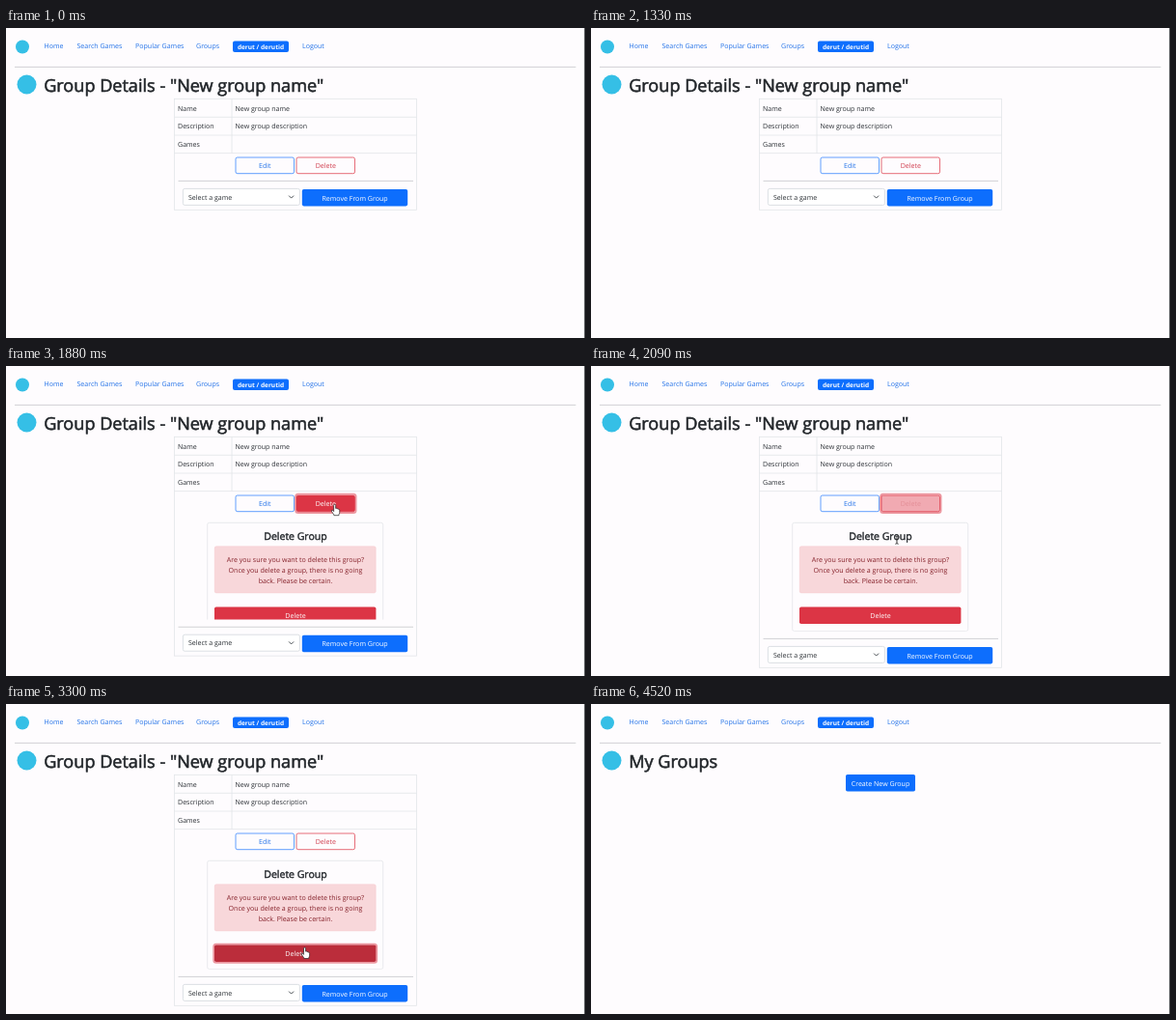
An HTML page for the animation above (5790 ms loop, 600x321 px).

```html
<!DOCTYPE html>
<html lang="en">
<head>
<meta charset="utf-8">
<title>Group details</title>
<style>
  html, body { margin: 0; width: 100%; height: 100%; overflow: hidden; background: #fefcfe; }
  svg { display: block; width: 100vw; height: 100vh; }
  text { font: 7.05px "Open Sans", "Noto Sans", sans-serif; fill: #2b3035; text-rendering: geometricPrecision; }
  .link { fill: #2272e8; }
  .mid { text-anchor: middle; }
  .white { fill: #fff; }
  .badge { font-size: 6.5px; font-weight: 700; }
  .h1 { font-size: 18.08px; fill: #212529; stroke: #212529; stroke-width: .55px; }
  .h4 { font-size: 10.5px; fill: #212529; stroke: #212529; stroke-width: .4px; }
  .alert { fill: #842029; }
  .line { fill: none; stroke: #e3e5e9; stroke-width: .8; }
  .rule { stroke: #d2d2d5; stroke-width: 1; }
  .outline { fill: none; stroke: #0d6efd; stroke-width: .9; stroke-opacity: .72; }
  .ring { fill: none; stroke: #dc3545; stroke-width: 1.8; }
  .blue { fill: #0d6efd; }
  .cursor { fill: #fff; stroke: #222; stroke-width: .7; stroke-linejoin: round; }
</style>
</head>
<body>
<svg viewBox="0 0 600 321" preserveAspectRatio="none">
  <defs>
    <clipPath id="fold"><rect id="foldBox" x="200" y="155" width="200" height="0"/></clipPath>
  </defs>
  <rect width="600" height="321" fill="#fefcfe"/>

  <circle cx="17" cy="19.5" r="7" fill="#35bfe6"/>
  <text class="link" x="39.5" y="21">Home</text>
  <text class="link" x="73.5" y="21">Search Games</text>
  <text class="link" x="134" y="21">Popular Games</text>
  <text class="link" x="197" y="21">Groups</text>
  <rect class="blue" x="235" y="13.5" width="58" height="11.5" rx="2"/>
  <text class="badge white mid" x="264" y="21.7">derut / derutid</text>
  <text class="link" x="307" y="21">Logout</text>
  <path class="rule" d="M9 40.4H590.5"/>
  <circle cx="21.5" cy="58.5" r="10" fill="#35bfe6"/>
  <text id="title" class="h1" x="39.2" y="65.8"></text>

  <g id="details">
    <path class="line" d="M174.5 92.3H425.5M174.5 111H425.5M174.5 129.6H425.5M234 73.3V129.6"/>
    <rect id="frame" class="line" x="174.5" y="73.3" width="251" height="115"/>
    <text x="178" y="85.6">Name</text>
    <text x="237.5" y="85.6">New group name</text>
    <text x="178" y="104.4">Description</text>
    <text x="237.5" y="104.4">New group description</text>
    <text x="178" y="123">Games</text>

    <rect class="outline" x="238" y="134" width="60.5" height="16.7" rx="1.8"/>
    <text class="link mid" x="268.3" y="145">Edit</text>
    <rect id="ring1" class="ring" x="300.1" y="132.7" width="62.5" height="19.3" rx="2.6"/>
    <rect id="del" x="301" y="134" width="60.5" height="16.7" rx="1.8" stroke="#dc3545" stroke-width=".9" stroke-opacity=".8"/>
    <text id="delText" class="mid" x="331.3" y="145">Delete</text>

    <g clip-path="url(#fold)">
      <rect class="line" x="208.7" y="162.3" width="182" height="112.2" rx="2"/>
      <text class="h4 mid" x="300" y="180.4">Delete Group</text>
      <rect x="216.2" y="186.7" width="167" height="48.3" rx="1.8" fill="#f8d7da" stroke="#f5c2c7" stroke-width=".4"/>
      <text class="alert mid" x="300" y="202.5">Are you sure you want to delete this group?</text>
      <text class="alert mid" x="300" y="213.5">Once you delete a group, there is no going</text>
      <text class="alert mid" x="300" y="224.5">back. Please be certain.</text>
      <rect id="ring2" class="ring" x="215.2" y="248.7" width="169" height="19.2" rx="2.6"/>
      <rect id="confirm" x="216" y="249.5" width="167.4" height="17.6" rx="1.8"/>
      <text class="white mid" x="300" y="260.9">Delete</text>
    </g>

    <g id="lower">
      <path class="rule" d="M178.5 158.4H422"/>
      <rect x="183.4" y="166.4" width="121" height="17" rx="1.8" fill="#fff" stroke="#d3d8dd" stroke-width=".8"/>
      <text x="189" y="177.5">Select a game</text>
      <path d="M293.4 173.9L295.6 176.1L297.8 173.9" fill="none" stroke="#343a40" stroke-width=".9" stroke-linecap="round"/>
      <rect class="blue" x="306.8" y="166.9" width="109.4" height="17.5" rx="1.8"/>
      <text class="white mid" x="361.5" y="178.6">Remove From Group</text>
    </g>
  </g>

  <g id="groups">
    <rect class="blue" x="264" y="73" width="72" height="17.6" rx="1.8"/>
    <text class="white mid" x="300" y="84.6">Create New Group</text>
  </g>

  <path d="M599.5 0V321" stroke="#77797c" stroke-width="1"/>

  <g id="pointer" class="cursor">
    <path id="arrow" d="M0 0V8.6L2 6.8L3.4 9.8L4.7 9.2L3.4 6.3H6.1Z"/>
    <path id="hand" d="M-1 .8A1 1 0 0 1 1 .8V3.9Q2.3 3.4 2.7 4.4Q3.9 4 4.1 5Q5.1 4.9 5.1 6V8Q5 9.4 4.3 10.3V11.2H-.8V10.4Q-2.2 8.8 -3.3 6.7Q-3.6 5.4 -2.4 5.7L-1 7.1Z"/>
    <path id="beam" d="M-1.6 -4Q0 -4 0 -3.2Q0 -4 1.6 -4M0 -3.2V3.2M-1.6 4Q0 4 0 3.2Q0 4 1.6 4" fill="none" stroke-width=".9"/>
  </g>
</svg>
<script>
const LOOP = 5790;
const HOVER_IN = 1550, CLICK = 1640, OPEN = 1662, HOVER_OUT = 2040;
const CONFIRM_HOVER = 2440, CONFIRM_CLICK = 2930, NEXT_PAGE = 3510;
const MOVE_OFF = 4360, ENTER = 1480, EXIT = 4515;
const OPEN_HEIGHT = 124;

// time, x, y of the pointer's hot spot
const route = [
  [ENTER, 412, 158], [1530, 372, 148], [1600, 340.8, 143.5], [1960, 340.6, 143.5],
  [HOVER_OUT, 330, 152], [2090, 317, 180], [2200, 314, 207], [2330, 311, 236],
  [2450, 309.5, 252.3], [MOVE_OFF, 309.5, 252.3], [4420, 370, 249], [4490, 582, 240], [EXIT, 600, 240]
];

const el = {};
document.querySelectorAll('svg [id]').forEach(n => el[n.id] = n);
const set = (id, name, value) => el[id].setAttribute(name, value);
const show = (id, on) => set(id, 'visibility', on ? 'visible' : 'hidden');
const clamp = v => Math.min(1, Math.max(0, v));
const lerp = (a, b, p) => a + (b - a) * p;
const mix = (a, b, p) => `rgb(${a.map((v, i) => Math.round(lerp(v, b[i], p)))})`;

// CSS "ease": cubic-bezier(.25, .1, .25, 1)
function ease(x) {
  x = clamp(x);
  const bez = (a, b, s) => 3 * a * s * (1 - s) ** 2 + 3 * b * s * s * (1 - s) + s ** 3;
  let lo = 0, hi = 1;
  for (let i = 0; i < 24; i++) {
    const s = (lo + hi) / 2;
    if (bez(.25, .25, s) < x) lo = s; else hi = s;
  }
  return bez(.1, 1, lo);
}
const fade = (t, start, length = 150) => ease((t - start) / length);

function pointerAt(t) {
  let i = 0;
  while (i < route.length - 2 && t > route[i + 1][0]) i++;
  const [t0, x0, y0] = route[i], [t1, x1, y1] = route[i + 1];
  const p = clamp((t - t0) / (t1 - t0));
  return [lerp(x0, x1, p), lerp(y0, y1, p)];
}

function pointerKind(t, y) {
  if (t >= MOVE_OFF || t < HOVER_IN) return 'arrow';
  if (t < HOVER_OUT || t >= CONFIRM_HOVER) return 'hand';
  return (y > 170 && y < 184) || (y > 193 && y < 228) ? 'beam' : 'arrow';
}

function draw(t) {
  const onDetails = t < NEXT_PAGE;
  el.title.textContent = onDetails ? 'Group Details - "New group name"' : 'My Groups';
  set('details', 'display', onDetails ? 'inline' : 'none');
  set('groups', 'display', onDetails ? 'none' : 'inline');

  const drop = OPEN_HEIGHT * fade(t, OPEN, 350);
  set('lower', 'transform', `translate(0 ${drop})`);
  set('frame', 'height', 115 + drop);
  set('foldBox', 'height', Math.max(0, drop - 4.2));

  const hover = fade(t, HOVER_IN) - fade(t, HOVER_OUT);
  set('del', 'fill', `rgba(220,53,69,${hover})`);
  set('delText', 'style', `fill:${mix([208, 62, 78], [255, 255, 255], hover)}`);
  set('confirm', 'fill', mix([220, 53, 69], [187, 45, 59], fade(t, CONFIRM_HOVER)));
  const moved = fade(t, CONFIRM_CLICK);
  set('ring1', 'opacity', .5 * (fade(t, CLICK) - moved));
  set('ring2', 'opacity', .5 * moved);

  const [x, y] = pointerAt(t);
  const visible = t >= ENTER && t < EXIT;
  const kind = pointerKind(t, y);
  set('pointer', 'transform', `translate(${x} ${y})`);
  for (const id of ['arrow', 'hand', 'beam']) show(id, visible && id === kind);
}

const start = performance.now();
function tick() {
  draw((performance.now() - start) % LOOP);
  requestAnimationFrame(tick);
}
tick();
</script>
</body>
</html>
```
